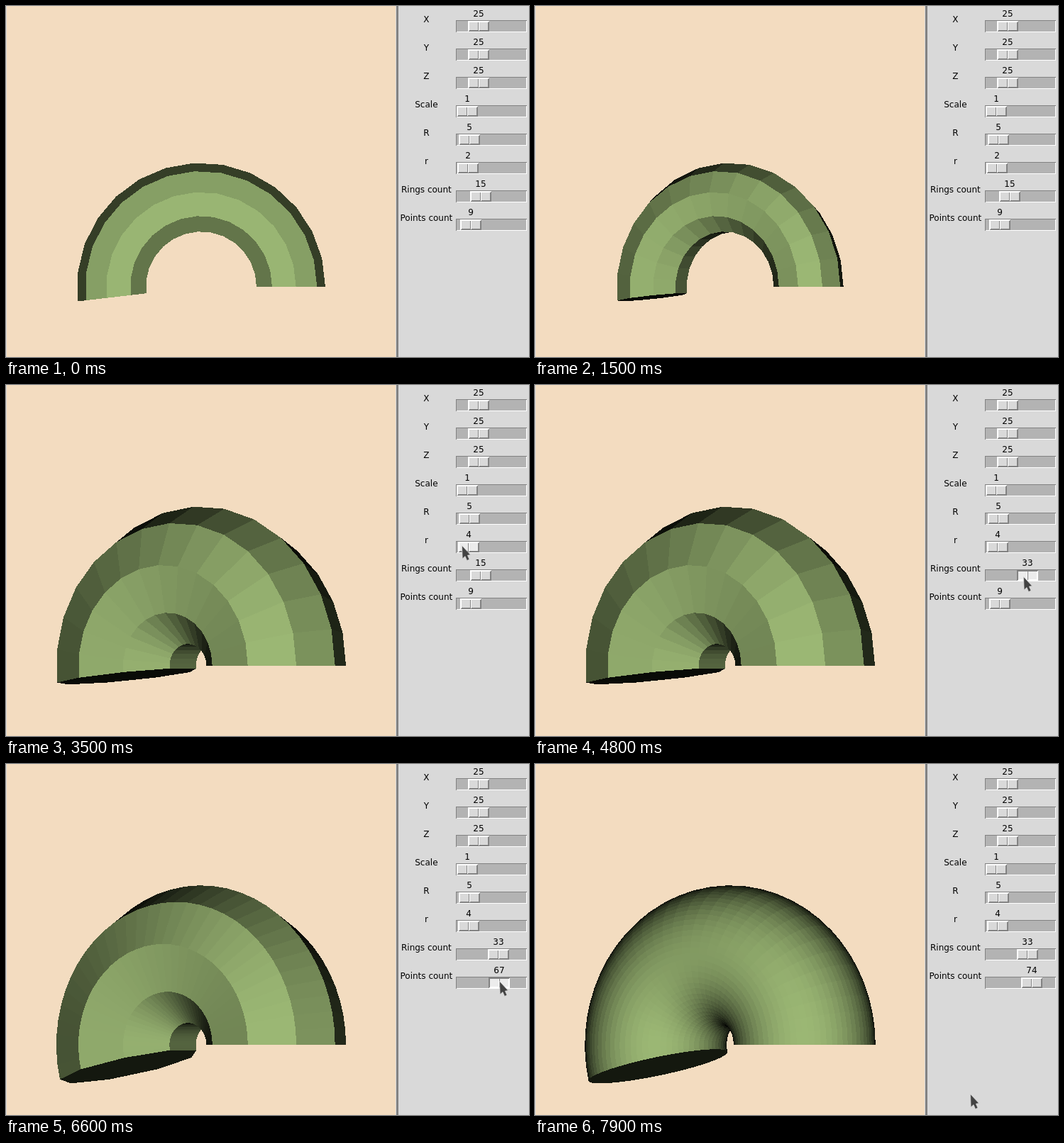
An HTML page with a canvas that plays this animation: 737x495 px, repeating every 8000 ms.

```html
<!DOCTYPE html>
<html lang="en">
<head>
<meta charset="utf-8">
<title>Torus viewer</title>
<style>
  html, body { margin: 0; width: 100%; height: 100%; overflow: hidden; background: #d9d9d9; }
  canvas, svg { position: absolute; left: 0; top: 0; display: block; }
  rect { shape-rendering: crispEdges; }
  .text { position: absolute; width: 100px; text-align: center; white-space: nowrap;
    font: 12px/14px "DejaVu Sans", sans-serif; color: #000; }
</style>
</head>
<body>
<canvas id="view" width="549" height="495"></canvas>
<svg id="panel" width="737" height="495" viewBox="0 0 737 495"></svg>
<script>
const LOOP = 8000, TICK = 100;
const W = 549, H = 495, CX = 275, CY = 396.19, RAD = Math.PI / 180;
const BG = [243, 220, 192], BASE = [156, 184, 117];

// A value that eases to each target in turn; moves are [begin, end, target].
const ease = u => Math.sin(Math.PI / 2 * Math.min(1, Math.max(0, u)));
const track = (start, ...moves) => t =>
  moves.reduce((v, [t0, t1, to]) => v + (to - v) * ease((t - t0) / (t1 - t0)), start);
const within = (span, t) => !!span && t >= span[0] && t < span[1];

const turn = track(0, [500, 600, 2.5], [1100, 1500, 27.5], [1600, 1700, 29.5], [1900, 2000, 33]);
const pointerX = track(674, [2000, 2300, 677], [2300, 2700, 648], [2800, 2900, 642], [3600, 4200, 669],
  [4300, 4400, 663], [4400, 4800, 688], [5100, 6000, 654], [6100, 6800, 699], [7200, 7900, 613]);
const pointerY = track(400, [2000, 2300, 183], [2300, 2700, 226], [3600, 4200, 278],
  [4300, 4400, 270], [5100, 6000, 306], [7200, 7900, 465]);

const sliders = [
  { name: "X", value: track(25) },
  { name: "Y", value: track(25) },
  { name: "Z", value: track(25) },
  { name: "Scale", value: track(1) },
  { name: "R", value: track(5) },
  { name: "r", value: track(2, [2900, 3000, 4]), hover: [2900, 3700], press: [3000, 3500] },
  { name: "Rings count", max: 50, value: track(15, [4400, 4800, 33]), hover: [4400, 5200], press: [4500, 5100] },
  { name: "Points count", value: track(9, [6100, 6800, 74]), hover: [6000, 7300], press: [6100, 6900] }
];
const [tube, rings, points] = sliders.slice(-3);

// The mesh takes a slider's new value only when the knob is released.
const applied = (s, t) => s.value(t < s.press[1] ? 0 : t);

// ---- 3D view: flat shading with a depth buffer ----
const ctx = document.getElementById("view").getContext("2d");
const image = ctx.createImageData(W, H);
const pixels = new Uint32Array(image.data.buffer);
const depth = new Float32Array(W * H);
const pack = ([r, g, b], k = 1) => (255 << 24 | b * k << 16 | g * k << 8 | r * k) >>> 0;

function triangle(a, b, c) {
  const ux = b.x - a.x, uy = a.y - b.y, uz = b.z - a.z;
  const vx = c.x - a.x, vy = a.y - c.y, vz = c.z - a.z;
  const nz = ux * vy - uy * vx;
  if (nz <= 1e-6) return;
  const nx = uy * vz - uz * vy, ny = uz * vx - ux * vz;
  const color = pack(BASE, nz / Math.hypot(nx, ny, nz));
  const x0 = Math.max(0, Math.floor(Math.min(a.x, b.x, c.x)));
  const x1 = Math.min(W - 1, Math.ceil(Math.max(a.x, b.x, c.x)));
  const y0 = Math.max(0, Math.floor(Math.min(a.y, b.y, c.y)));
  const y1 = Math.min(H - 1, Math.ceil(Math.max(a.y, b.y, c.y)));
  for (let y = y0; y <= y1; y++) {
    for (let x = x0; x <= x1; x++) {
      const px = x + .5 - a.x, py = a.y - y - .5;
      const s = (px * vy - py * vx) / nz, t = (ux * py - uy * px) / nz;
      if (s < -1e-9 || t < -1e-9 || s + t > 1 + 1e-9) continue;
      const z = a.z + s * uz + t * vz, i = y * W + x;
      if (z > depth[i]) { depth[i] = z; pixels[i] = color; }
    }
  }
}

function drawTorus(angle, ringCount, pointCount, r) {
  const cos = Math.cos(angle * RAD), sin = Math.sin(angle * RAD);
  const vertex = (i, j) => {
    const a = i * 200 / ringCount * RAD, p = j * 360 / pointCount * RAD;
    const q = 125 + r * Math.cos(p), X = q * Math.cos(a), Z = r * Math.sin(p);
    return { x: CX + X * cos - Z * sin, y: CY - q * Math.sin(a), z: X * sin + Z * cos };
  };
  const grid = Array.from({ length: ringCount }, (_, i) =>
    Array.from({ length: pointCount + 1 }, (_, j) => vertex(i, j % pointCount)));
  pixels.fill(pack(BG));
  depth.fill(-1e9);
  for (let i = 0; i < ringCount - 1; i++) {
    for (let j = 0; j < pointCount; j++) {
      const a = grid[i][j], c = grid[i + 1][j + 1];
      triangle(a, grid[i + 1][j], c);
      triangle(a, c, grid[i][j + 1]);
    }
  }
  const end = grid[ringCount - 1];
  for (let j = 1; j < pointCount - 1; j++) triangle(end[0], end[j + 1], end[j]);
  ctx.putImageData(image, 0, 0);
  ctx.fillStyle = "#d9d9d9";
  ctx.fillRect(0, 0, 1, H);
}

// ---- control panel ----
const panel = document.getElementById("panel");
function add(parent, tag, attrs) {
  const el = document.createElementNS("http://www.w3.org/2000/svg", tag);
  for (const k in attrs) el.setAttribute(k, attrs[k]);
  return parent.appendChild(el);
}
const box = (parent, x, y, width, height, fill) => add(parent, "rect", { x, y, width, height, fill });

function text(center, top, content = "") {
  const el = document.createElement("div");
  el.className = "text";
  el.style.left = center - 50 + "px";
  el.style.top = top + "px";
  el.textContent = content;
  return document.body.insertBefore(el, panel);
}
function bevel(g, x, y, w, h) {
  return [box(g, x, y, w, h), box(g, x + 1, y + 1, w - 1, h - 1), box(g, x + 1, y + 1, w - 2, h - 2)];
}
function paint(parts, sunken, face) {
  const edge = sunken ? ["#828282", "#fff"] : ["#fff", "#828282"];
  [...edge, face].forEach((c, i) => parts[i].setAttribute("fill", c));
}

box(panel, 550, 0, 3, H, "#828282");
sliders.forEach((s, i) => {
  const y = i * 40;
  text(592.4, y + 12, s.name);
  paint(bevel(panel, 634, y + 20, 100, 17), true, "#b3b3b3");
  s.label = text(0, y + 4);
  s.knob = add(panel, "g", {});
  s.faces = [[0, 0, 30, 15], [1, 1, 14, 13], [15, 1, 14, 13]]
    .map(([x, dy, w, h]) => bevel(s.knob, x, y + 21 + dy, w, h));
});
const arrow = add(panel, "path", {
  d: "M.5 .5 L1.2 19 L5 15.6 L7.6 21.5 L11 20 L8.4 14.2 L12.6 13.4 Z",
  fill: "#434343", stroke: "#ddd", "stroke-width": .7, "stroke-linejoin": "round"
});

function drawPanel(t) {
  for (const s of sliders) {
    const value = Math.floor(s.value(t));
    const x = Math.round(635 + 68 * (value - 1) / ((s.max || 100) - 1));
    s.label.textContent = value;
    s.label.style.left = x + 15 - 50 + "px";
    s.knob.setAttribute("transform", `translate(${x} 0)`);
    const face = within(s.hover, t) ? "#ececec" : "#d9d9d9";
    s.faces.forEach(f => paint(f, within(s.press, t), face));
  }
  arrow.setAttribute("transform", `translate(${Math.round(pointerX(t))} ${Math.round(pointerY(t))})`);
  arrow.setAttribute("visibility", t < 2000 ? "hidden" : "visible");
}

let shownTick = -1, shownMesh = "";
function frame() {
  const t = Math.floor(performance.now() % LOOP / TICK) * TICK;
  if (t !== shownTick) {
    shownTick = t;
    const mesh = [turn(t), applied(rings, t), applied(points, t), 25 * applied(tube, t)];
    if (mesh.join() !== shownMesh) {
      shownMesh = mesh.join();
      drawTorus(...mesh);
    }
    drawPanel(t);
  }
  requestAnimationFrame(frame);
}
frame();
</script>
</body>
</html>
```
